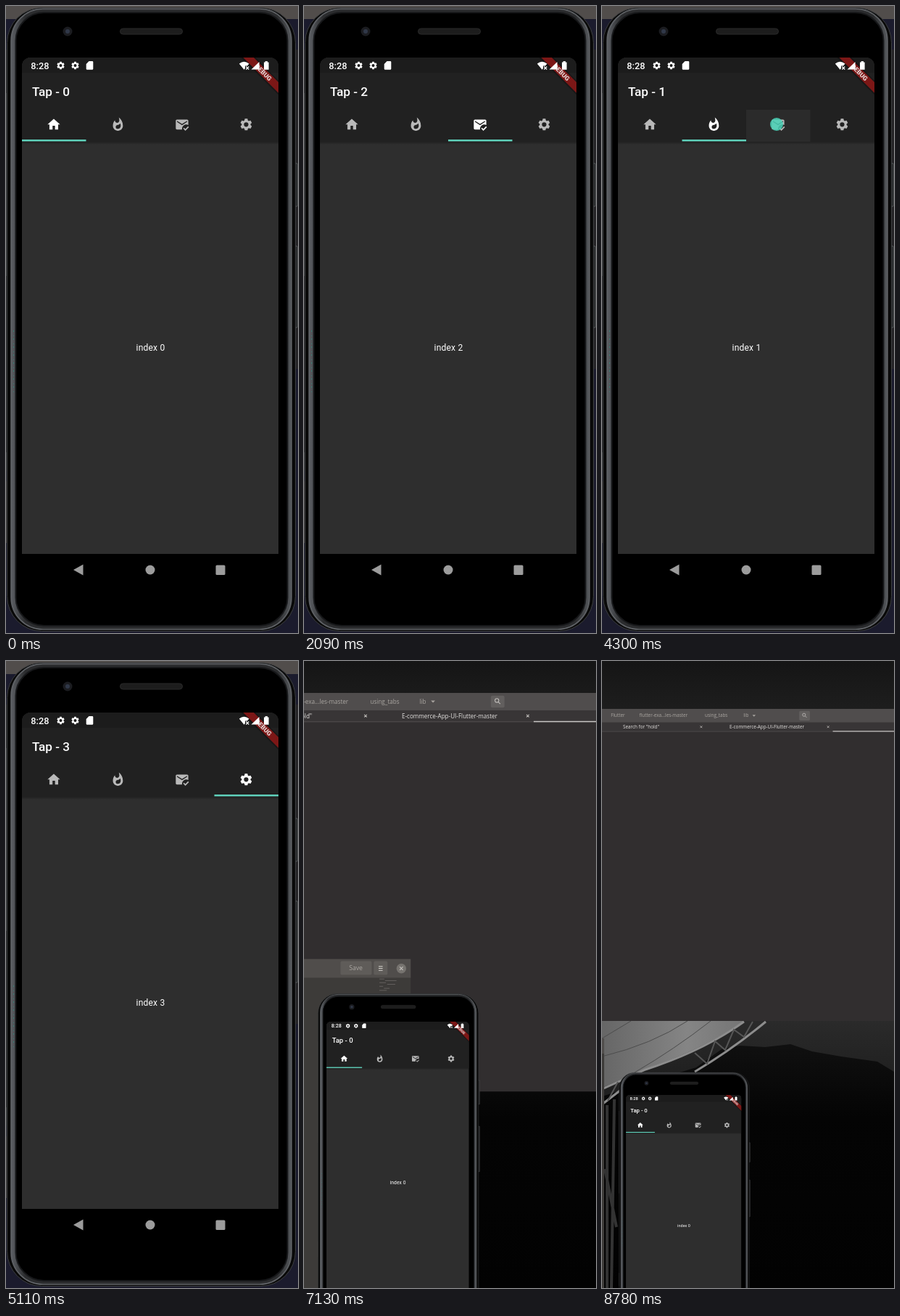
An HTML page for the animation above (8.88 s loop, 403 by 864 pixels).

```html
<!DOCTYPE html>
<html lang="en">
<head>
<meta charset="utf-8">
<title>Tab bar demo</title>
<style>
html, body { margin: 0; width: 100%; height: 100%; overflow: hidden; background: #000; }
svg { display: block; width: 403px; height: 864px; }
text { font-family: Roboto, "Noto Sans", sans-serif; fill: #fff; }
.ide text { font: 15.5px "Open Sans", "Noto Sans", sans-serif; fill: #aaa6a1; }
.ide .tab { fill: #e4e2e0; }
.page { font-size: 12.06px; letter-spacing: .21px; text-anchor: middle; }
</style>
</head>
<body>
<svg viewBox="0 0 403 864">
  <defs>
    <linearGradient id="sky" x2="0" y2="1">
      <stop offset="0" stop-color="#151515"/><stop offset=".08" stop-color="#1e1e1e"/>
      <stop offset=".57" stop-color="#2b2b2b"/><stop offset=".66" stop-color="#202020"/>
    </linearGradient>
    <linearGradient id="hill" x2="0" y2="1">
      <stop offset="0" stop-color="#101010"/><stop offset=".3" stop-color="#040404"/><stop offset="1" stop-color="#020202"/>
    </linearGradient>
    <linearGradient id="dish" x2="1" y2="0">
      <stop offset="0" stop-color="#666"/><stop offset=".6" stop-color="#858585"/><stop offset="1" stop-color="#757575"/>
    </linearGradient>
    <linearGradient id="rim">
      <stop offset="0" stop-color="#5c5f64"/><stop offset=".05" stop-color="#2b2c2e"/>
      <stop offset=".95" stop-color="#2b2c2e"/><stop offset="1" stop-color="#55585c"/>
    </linearGradient>
    <linearGradient id="drop" x2="0" y2="1">
      <stop offset="0" stop-opacity=".3"/><stop offset="1" stop-opacity="0"/>
    </linearGradient>
    <clipPath id="screen"><path d="M22 755V83a12 12 0 0 1 12-12H364a12 12 0 0 1 12 12V755z"/></clipPath>
    <clipPath id="body"><path d="M22 187H376V755H22z"/></clipPath>
    <clipPath id="cell"><rect id="cellBox" y="143" width="88.5" height="44"/></clipPath>
  </defs>

  <g id="desk">
    <path fill="#1b1b2d" d="M0 0H403V864H0z"/>
    <path fill="#514d4b" d="M0 0H403V18H0z"/>
    <path fill="#252427" d="M396 60H403V500H396zM0 60H6V640H0z"/>
    <path fill="#3c3a3a" d="M0 655H4V740H0z"/>
  </g>

  <g id="overview">
    <path fill="url(#sky)" d="M0 0H403V864H0z"/>
    <path fill="url(#hill)" d="M0 600L130 560 165 535 190 530 225 532 260 528 290 538 330 545 380 552 403 566V864H0z"/>
    <path fill="url(#dish)" d="M0 496H196Q140 535 60 562L0 588z"/>
    <path fill="none" stroke="#4c4c4c" d="M0 545Q70 528 118 496M45 567Q100 535 150 496M0 520L40 496"/>
    <path fill="none" stroke="#8d8d8d" stroke-width="3" d="M226 497Q180 535 128 566M196 497Q140 537 60 563L0 590M30 588L0 611"/>
    <path fill="none" stroke="#555" stroke-width="2" d="M208 497L196 518 182 508 170 536 156 524 145 555 128 540M22 580L8 606"/>
    <path fill="none" stroke="#333" stroke-width="4" d="M7 612V864M17 604L13 864M4 700L20 780"/>
    <g id="editor" class="ide">
      <path fill="#312e2f" d="M-1500 0H1500V1050H-1500z"/>
      <path fill="#504d4d" d="M-1500 0H1500V46H-1500z"/>
      <path fill="#383536" d="M-1500 46H1500V77H-1500z"/>
      <path fill="#504d4d" d="M-1500 75H348V77H-1500z"/>
      <path fill="#c9c7c5" d="M348 74H1500V77H348z"/>
      <text x="-400" y="28">Flutter</text>
      <text x="-304" y="28">flutter-exa...les-master</text>
      <text x="-83" y="28">using_tabs</text>
      <text x="47" y="28">lib</text>
      <path fill="#aaa6a1" d="M77 20h11l-5.500 6z"/>
      <rect x="235" y="7" width="36" height="32" rx="4" fill="#625f5e"/>
      <path fill="none" stroke="#c2bfbc" stroke-width="2" d="M255 24l5 5M256 20a5 5 0 1 1-10 0a5 5 0 1 1 10 0"/>
      <text class="tab" x="-359" y="67">Search for "hold"</text>
      <text class="tab" x="0" y="67">E-commerce-App-UI-Flutter-master</text>
      <path stroke="#c2bfbc" stroke-width="2" d="M-99 57l7 7m0-7l-7 7M329 57l7 7m0-7l-7 7"/>
    </g>
    <g id="notes" class="ide">
      <path fill="#3d3b39" d="M-1500 0H0V1050H-1500z"/>
      <path fill="#504d4b" d="M-1500 0H0V46H-1500z"/>
      <g fill="#5f5c59">
        <rect x="-173" y="5" width="77" height="34" rx="4"/><rect x="-91" y="5" width="34" height="34" rx="4"/>
        <circle cx="-23" cy="23" r="12" fill="#76736f"/>
      </g>
      <text x="-152" y="28">Save</text>
      <path stroke="#c6c3bf" stroke-width="2" d="M-79 18h10m-10 5h10m-10 5h10M-27 19l8 8m0-8l-8 8"/>
      <path stroke="#6b6865" stroke-width="1.500" d="M-77 49h12m2 4h28m-42 5h16m3 4h20m-39 5h9m2 5h14m-25 5h18"/>
    </g>
  </g>

  <g id="phone">
    <path fill="#1d1e20" stroke="#55585a" d="M398 217h4v59h-4zM398 331h4v112h-4z"/>
    <path stroke="#4a4c4e" d="M1 120V372M1 615V655"/>
    <rect x="1.500" y="2.500" width="398" height="859" rx="48" fill="#090909" stroke="#3c3e40"/>
    <rect x="7" y="4" width="387" height="855" rx="44" fill="url(#rim)" stroke="#606367" stroke-width="1.500"/>
    <rect x="13.500" y="9" width="375" height="845" rx="39" fill="#000" stroke="#17181a" stroke-width="2"/>
    <path stroke="#2a8f80" stroke-dasharray="2 5 1 3" opacity=".7" d="M10.500 447V535"/>
    <circle cx="85" cy="35" r="6.500" fill="#1b1c20"/><circle cx="85" cy="35" r="3" fill="#303848"/>
    <rect x="157.500" y="31" width="86" height="8" rx="4" fill="#1d1d1d" stroke="#292929"/>
    <g clip-path="url(#screen)">
      <path fill="#2e2e2e" d="M22 71H376V755H22z"/>
      <path fill="url(#drop)" d="M22 187H376V191H22z"/>
      <path fill="#212121" d="M22 71H376V187H22z"/>
      <path fill="#1c1c1c" d="M22 71H376V92H22z"/>
      <text id="title" x="36" y="124.300" font-size="17.200" font-weight="500"></text>
      <g clip-path="url(#body)">
        <text id="pageA" class="page" y="475"></text>
        <text id="pageB" class="page" y="475"></text>
      </g>
      <rect id="glow" y="143" width="88.500" height="44" fill="#fff"/>
      <g id="tabs"></g>
      <g clip-path="url(#cell)"><circle id="splash" cy="163" fill="#4bd3b8"/></g>
      <rect id="bar" y="184" width="88.500" height="2.500" fill="#5fd0ba"/>
      <g transform="translate(376 71) rotate(45)">
        <path fill="#000" opacity=".3" d="M-50 22.500H50V36.500H-50z"/>
        <path fill="#7c1716" d="M-50 24.100H50V34.400H-50z"/>
        <text y="32.400" font-size="8.800" font-weight="900" text-anchor="middle" style="fill:#e6d3d3">DEBUG</text>
      </g>
      <text x="34.300" y="86.600" font-size="12.800" font-weight="500">8:28</text>
      <g id="status" fill="#fff">
        <path d="M114.500 76H119a1.300 1.300 0 0 1 1.300 1.300V86.500a1.300 1.300 0 0 1-1.300 1.300H112a1.300 1.300 0 0 1-1.300-1.300V80z"/>
        <path d="M321.800 79.500Q328.500 74 335.500 79.500L333 82.500H330V86L328.600 87.800z"/>
        <path stroke="#fff" stroke-width="1.200" d="M331.200 83.500l4 4m0-4l-4 4"/>
        <path d="M349.500 77V87.500H338.500z"/>
        <path d="M356 77.500h1.700V76h3.200v1.500h1.700V87.700H356z"/>
      </g>
    </g>
    <g fill="#9c9c9c">
      <path d="M93 777L106.500 769.500V784.500z"/><circle cx="199" cy="777" r="6.500"/>
      <rect x="289.500" y="770.500" width="13" height="13.500" rx="1.500"/>
    </g>
  </g>
</svg>
<script>
const LOOP = 8880, LEFT = 22, CELL = 88.5, PAGE = 354, MID = 199.5;
const $ = id => document.getElementById(id);
const clamp = v => Math.min(1, Math.max(0, v));
const mix = (a, b, p) => a + (b - a) * p;

// press time, start of the slide, tab index
const taps = [
  [1010, 1060, 1], [1740, 1790, 2], [2540, 2541, 3], [3120, 3180, 0],
  [3820, 3870, 1], [4300, 4301, 2], [4750, 4800, 3], [5470, 5520, 0]
];
// first change, last change, number of changes
const bursts = [
  [1010, 1400, 8], [1740, 2090, 8], [2540, 2860, 7], [3120, 3540, 8], [3820, 4180, 8],
  [4300, 4610, 7], [4750, 5110, 8], [5470, 5820, 8], [7020, 7230, 5]
];

function gear() {
  const pts = [];
  for (let i = 0; i < 6; i++)
    for (const [r, a] of [[7.1, -23], [9.5, -13], [9.5, 13], [7.1, 23]]) {
      const w = (i * 60 + a) * Math.PI / 180;
      pts.push((12 + r * Math.sin(w)).toFixed(2) + " " + (12 - r * Math.cos(w)).toFixed(2));
    }
  return "M" + pts.join("L") + "zM15.600 12a3.600 3.600 0 1 0-7.200 0a3.600 3.600 0 1 0 7.200 0z";
}

const icons = [
  "M10 20v-6h4v6h5v-8h3L12 3 2 12h3v8z",
  "M13.5.67s.74 2.65.74 4.8c0 2.06-1.35 3.73-3.41 3.73-2.07 0-3.63-1.67-3.63-3.73l.03-.36C5.21 7.51 4 10.62 4 14c0 4.42 3.58 8 8 8s8-3.58 8-8C20 8.61 17.41 3.8 13.5.67zM11.71 19c-1.78 0-3.22-1.4-3.22-3.14 0-1.62 1.05-2.76 2.81-3.12 1.77-.36 3.6-1.21 4.62-2.58.39 1.29.59 2.65.59 4.04 0 2.65-2.15 4.8-4.8 4.8z",
  "M12 19c0-3.87 3.13-7 7-7 1.08 0 2.09.25 3 .68V6c0-1.1-.9-2-2-2H4c-1.1 0-2 .9-2 2v12c0 1.1.9 2 2 2h8.08c-.05-.33-.08-.66-.08-1zM4 6l8 5 8-5v2l-8 5-8-5V6zm13.34 16l-3.54-3.54 1.41-1.41 2.12 2.12 4.24-4.24L23 16.34 17.34 22z",
  gear()
];

function addIcon(parent, d, x, y, size) {
  const k = size / 24, path = document.createElementNS("http://www.w3.org/2000/svg", "path");
  path.setAttribute("d", d);
  path.setAttribute("fill-rule", "evenodd");
  path.setAttribute("transform", `translate(${x - 12 * k} ${y - 12 * k}) scale(${k})`);
  parent.append(path);
  return path;
}

const tabIcons = icons.map((d, i) => addIcon($("tabs"), d, LEFT + CELL * (i + .5) - .3, 163.3, 20.7));
for (const x of [75.5, 95.5]) addIcon($("status"), icons[3], x, 82, 13.5);

// cubic-bezier(.25, .1, .25, 1)
function ease(x) {
  let lo = 0, hi = 1;
  for (let i = 0; i < 24; i++) {
    const s = (lo + hi) / 2;
    if (.75 * s * (1 - s) + s ** 3 < x) lo = s; else hi = s;
  }
  return .3 * lo * (1 - lo) ** 2 + 3 * (1 - lo) * lo * lo + lo ** 3;
}

function snap(t) {
  for (const [a, b, n] of bursts)
    if (t >= a && t < b) {
      const step = (b - a) / (n - 1);
      return a + Math.floor((t - a) / step + 1e-6) * step;
    }
  return t;
}

function set(id, attrs) {
  for (const key in attrs) $(id).setAttribute(key, attrs[key]);
}

function place(id, x0, y0, x1, y1, k, p) {
  set(id, { transform: `translate(${mix(x0, x1, p)} ${mix(y0, y1, p)}) scale(${mix(1, k, p)})` });
}

function drawTabs(t) {
  let from = 0, to = 0, p = 1;
  for (const [, start, index] of taps)
    if (t >= start) {
      from = to;
      to = index;
      p = ease(clamp((t - start) / 300));
    }
  const dir = Math.sign(to - from);
  $("title").textContent = "Tap - " + to;
  $("pageA").textContent = "index " + from;
  $("pageB").textContent = "index " + to;
  set("pageA", { x: MID - dir * p * PAGE, visibility: p < 1 && dir ? "visible" : "hidden" });
  set("pageB", { x: MID + dir * (1 - p) * PAGE });
  set("bar", { x: LEFT + CELL * mix(from, to, p) });
  tabIcons.forEach((icon, i) => {
    const on = i === to ? p : i === from ? 1 - p : 0;
    const c = Math.round(mix(185, 255, on));
    icon.setAttribute("fill", `rgb(${c},${c},${c})`);
  });
}

function drawInk(t) {
  const tap = taps.find(([press]) => t >= press && t < press + 220);
  const age = tap ? t - tap[0] : 0, x = LEFT + CELL * (tap ? tap[2] : 0);
  const fade = tap ? clamp(1 - age / 200) : 0;
  set("cellBox", { x });
  set("glow", { x, opacity: .045 * fade });
  set("splash", { cx: x + 42, r: mix(9, 54, clamp(age / 60)), opacity: .85 * fade * fade });
}

function draw(now) {
  const t = snap(now % LOOP);
  drawTabs(t);
  drawInk(t);
  const p = 1 - (1 - clamp((t - 7020) / 187)) ** 2;
  set("desk", { visibility: p ? "hidden" : "visible" });
  set("overview", { visibility: p ? "visible" : "hidden" });
  place("phone", 0, 0, 23.1, 566, .4506, p);
  place("editor", -37.6, -48.6, 176, 66, .4095, p);
  place("notes", 753, -48, 3, 520, .455, p);
}

const begin = performance.now();
function tick() {
  draw(performance.now() - begin);
  requestAnimationFrame(tick);
}
tick();
</script>
</body>
</html>
```
